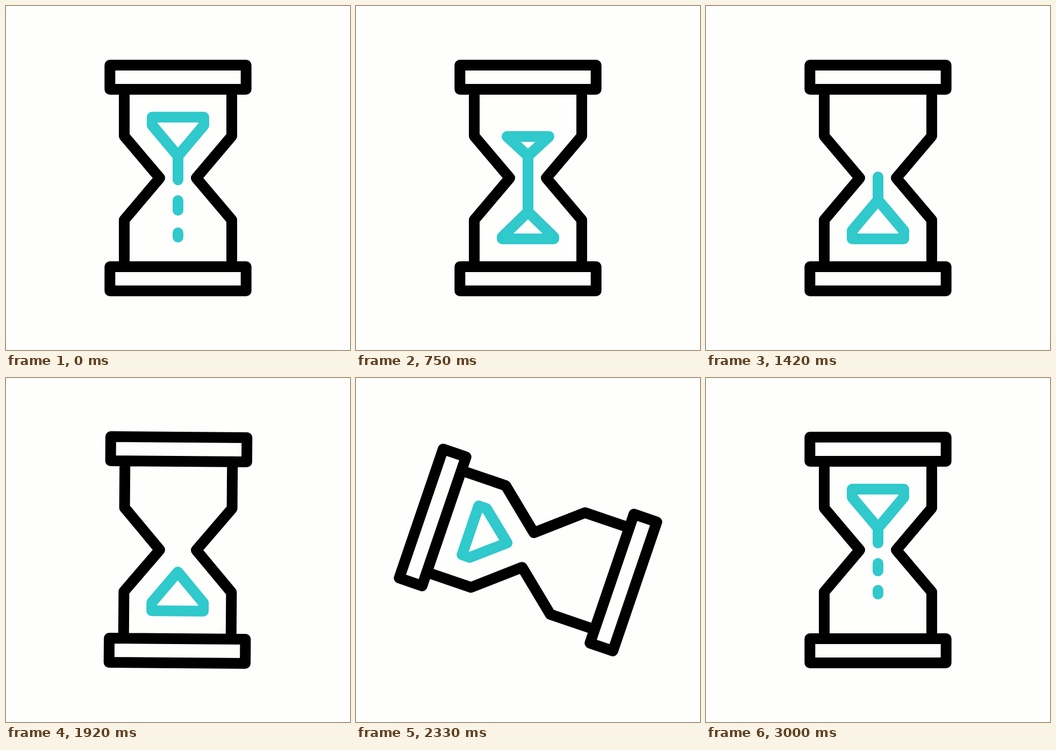
Animation, 640 px wide and 640 px high, one loop 3080 ms. Source, as an HTML page:

```html
<!DOCTYPE html>
<html lang="en">
<head>
<meta charset="utf-8">
<title>Hourglass</title>
<style>
  html, body { margin: 0; height: 100%; overflow: hidden; background: #fefefd; }
  svg { display: block; width: 100vw; height: 100vh; }
  path { fill: none; stroke-width: 20; stroke-linecap: round; stroke-linejoin: round; }
  .frame { stroke: #000; }
  .sand { stroke: #30c9cc; }
</style>
</head>
<body>
<svg viewBox="0 0 640 640">
  <g id="hourglass">
    <path class="frame" d="M193.3 110H446.7V155H193.3ZM193.3 485H446.7V530H193.3Z
      M220 155V242L286 320L220 398V485M420 155V242L354 320L420 398V485"/>
    <path class="sand" id="upper"/>
    <path class="sand" id="stream"/>
    <path class="sand" id="lower"/>
  </g>
</svg>
<script>
const LOOP = 3080, FRAME = 250 / 3;
const FLIP_START = 1884, FLIP_TIME = 753;
const MID = 320, HALF = 48;
const TOP = 206.7, SHOULDER = 222, NECK = 279;
const BASE = 640 - TOP, PEAK = 640 - NECK;
const DRAINED = 1290;

const byId = id => document.getElementById(id);
const clamp = x => Math.min(1, Math.max(0, x));
const mix = (a, b, p) => a + (b - a) * p;
const polygon = points => 'M' + points.map(p => p.join(' ')).join('L') + 'Z';

// Cubic bezier easing with flat ends and handles at x = a and x = b.
function ease(x, a = 0.5, b = 0.5) {
  x = clamp(x);
  let low = 0, high = 1, s = 0.5;
  for (let i = 0; i < 24; i++) {
    const r = 1 - s;
    if (3 * a * s * r * r + 3 * b * s * s * r + s * s * s < x) low = s; else high = s;
    s = (low + high) / 2;
  }
  return s * s * (3 - 2 * s);
}

// Time of the current step on the 12 steps per second grid.
function stepTime(t) {
  const start = k => Math.round(k * FRAME / 10) * 10;
  const k = Math.round(t / FRAME);
  return start(k) <= t ? start(k) : start(k - 1);
}

// The shoulders sink slower than the surface; once level, the sand narrows to the neck.
function upperSand(t) {
  if (t > DRAINED) return '';
  const level = mix(TOP, NECK, ease((t - 170) / 1160));
  const side = Math.max(level, SHOULDER + 0.45 * (level - TOP));
  const meeting = TOP + (SHOULDER - TOP) / 0.55;
  const half = HALF * Math.min(1, (NECK - level) / (NECK - meeting));
  return polygon([[MID - half, level], [MID - half, side], [MID, NECK],
    [MID + half, side], [MID + half, level]]);
}

const pileGrowth = t => ease((t - 40) / 1176);
const pilePeak = t => mix(BASE, PEAK, pileGrowth(t));

function lowerSand(t) {
  if (t < 40) return '';
  const half = HALF * clamp((t - 40) / 280);
  const side = mix(BASE, 640 - SHOULDER, pileGrowth(t) ** 4);
  return polygon([[MID - half, BASE], [MID - half, side], [MID, pilePeak(t)],
    [MID + half, side], [MID + half, BASE]]);
}

function streamSand(t) {
  const bottom = pilePeak(t);
  const tail = NECK + Math.max(0, t - DRAINED) * 0.3;
  const drops = [
    [0, 44.5 + 0.206 * t],
    [83 + 0.2125 * t, 101 + 0.2625 * t],
    [143 + 0.3375 * t, 151 + 0.35 * t]
  ];
  return drops.map(([from, to]) => {
    const y1 = Math.max(tail, NECK + from), y2 = Math.min(bottom, NECK + to);
    return y1 < y2 ? `M${MID} ${y1}V${y2}` : '';
  }).join('');
}

function draw(now) {
  const t = stepTime(now % LOOP);
  // Once turned over, the glass is upright again with its sand on top.
  const phase = t < FLIP_START + FLIP_TIME ? t : t - LOOP;
  const angle = 180 * ease((phase - FLIP_START) / FLIP_TIME, 0.57, 0.541);
  byId('hourglass').setAttribute('transform', `rotate(${angle} 320 320)`);
  byId('upper').setAttribute('d', upperSand(phase));
  byId('stream').setAttribute('d', streamSand(phase));
  byId('lower').setAttribute('d', lowerSand(phase));
}

const began = performance.now();
function tick() {
  draw(performance.now() - began);
  requestAnimationFrame(tick);
}
tick();
</script>
</body>
</html>
```
